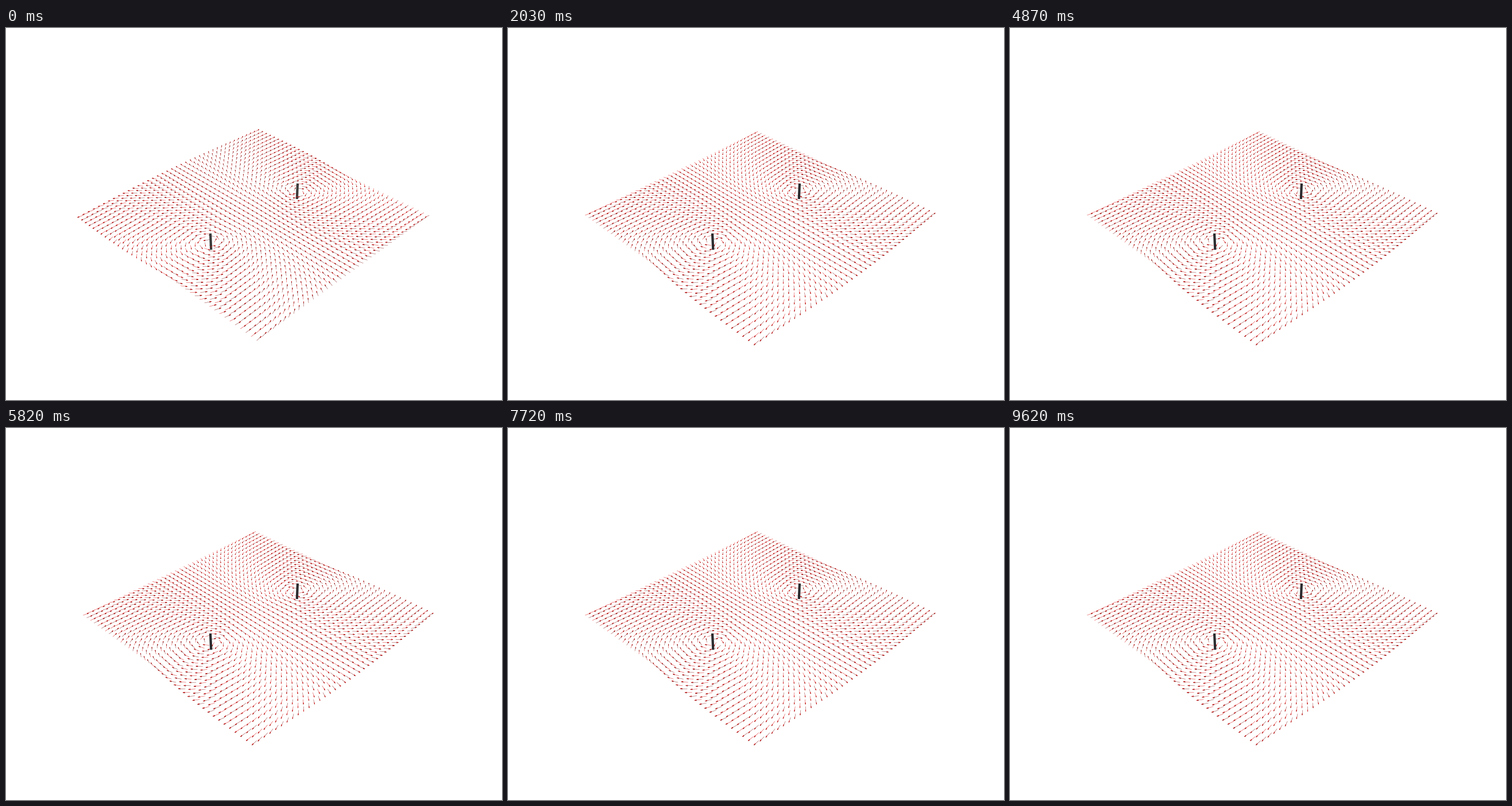
A matplotlib script that plays this animation: 864x648 px, repeating every 9.67 s.

```python
import numpy as np
import matplotlib.pyplot as plt
from matplotlib.animation import FuncAnimation

plt.rcParams["path.simplify"] = False

W, H = 864, 648
LOOP, FRAMES = 9670, 449
HOLD, LEAD = 11, 5           # ticks per current direction, head start of the first one

ELEV = np.radians(35.4)
DIST, SCALE = 11.64, 106.3
N, HALF = 40, 2.0
LENGTH, HEAD, SPREAD = 0.1, 0.3, np.radians(15)
WIRES = ((0, 1, 1), (0, -1, -1))     # x, y, sign of the current


def project(x, y, z=0.0):
    """Perspective view from azimuth -45 degrees, in pixels."""
    x = x + 0.05
    right = (x + y) / np.sqrt(2)
    away = (y - x) / np.sqrt(2)
    depth = 1 + (away * np.cos(ELEV) - z * np.sin(ELEV)) / DIST
    up = away * np.sin(ELEV) + z * np.cos(ELEV)
    return W / 2 + SCALE * right / depth, H / 2 - SCALE * up / depth


def field(x, y):
    """Unit direction of the magnetic field around the wires."""
    u, v = np.zeros_like(x), np.zeros_like(x)
    for wx, wy, sign in WIRES:
        dx, dy = x - wx, y - wy
        r2 = dx**2 + dy**2
        u -= sign * dy / r2
        v += sign * dx / r2
    size = np.hypot(u, v)
    return u / size, v / size


fig = plt.figure(figsize=(W / 72, H / 72), dpi=72, facecolor="white")
ax = fig.add_axes([0, 0, 1, 1])
ax.set_xlim(0, W)
ax.set_ylim(H, 0)
ax.axis("off")


def segments(start, end, color, width, order):
    """Draw many separate segments as one line."""
    gap = np.full(np.shape(start[0]), np.nan)
    xs = np.column_stack([start[0], end[0], gap]).ravel()
    ys = np.column_stack([start[1], end[1], gap]).ravel()
    line, = ax.plot(xs, ys, color=color, lw=width, zorder=order,
                    solid_capstyle="butt", snap=False)
    return line


gx, gy = (g.ravel() for g in np.meshgrid(np.linspace(-HALF, HALF, N),
                                         np.linspace(-HALF, HALF, N)))
fu, fv = field(gx, gy)
odd = np.arange(gx.size) % 2 == 1


def arrows(sign):
    u, v = sign * fu, sign * fv
    tx, ty = gx + LENGTH * u, gy + LENGTH * v
    tail, tip = project(gx, gy), project(tx, ty)
    parts = []
    for mask, color in ((~odd, "#e23c3c"), (odd, "#a04848")):
        parts.append(segments([c[mask] for c in tail], [c[mask] for c in tip],
                              color, 0.55, 2))
    back = LENGTH * HEAD * np.cos(SPREAD)
    rise = LENGTH * HEAD * np.sin(SPREAD)
    for dz, color in ((-rise, "#701414"), (rise, "#d81010")):
        barb = project(tx - back * u, ty - back * v, dz)
        parts.append(segments(barb, tip, color, 0.95, 3))
    return parts


def rods(color):
    parts = []
    for wx, wy, _ in WIRES:
        (x0, y0), (x1, y1) = project(wx, wy, -0.16), project(wx, wy, 0.16)
        parts += ax.plot([x0, x1], [y0, y1], color=color, lw=4.2, zorder=4,
                         solid_capstyle="butt")
    return parts


def glints():
    return [segments(([505.5, 356.8], [294.5, 381.5]),
                     ([507.5, 358.2], [293.5, 380.5]), "#c01818", 1.6, 5)]


states = (arrows(-1) + rods("#3b3b3b") + glints(),
          arrows(1) + rods("#2b2b2e"))


def update(i):
    current = (i + LEAD) // HOLD % 2
    for k, parts in enumerate(states):
        for part in parts:
            part.set_visible(k == current)
    return states[0] + states[1]


anim = FuncAnimation(fig, update, frames=FRAMES, init_func=lambda: update(0),
                     interval=LOOP / FRAMES, repeat=True, repeat_delay=0,
                     blit=False)
plt.show()
```
